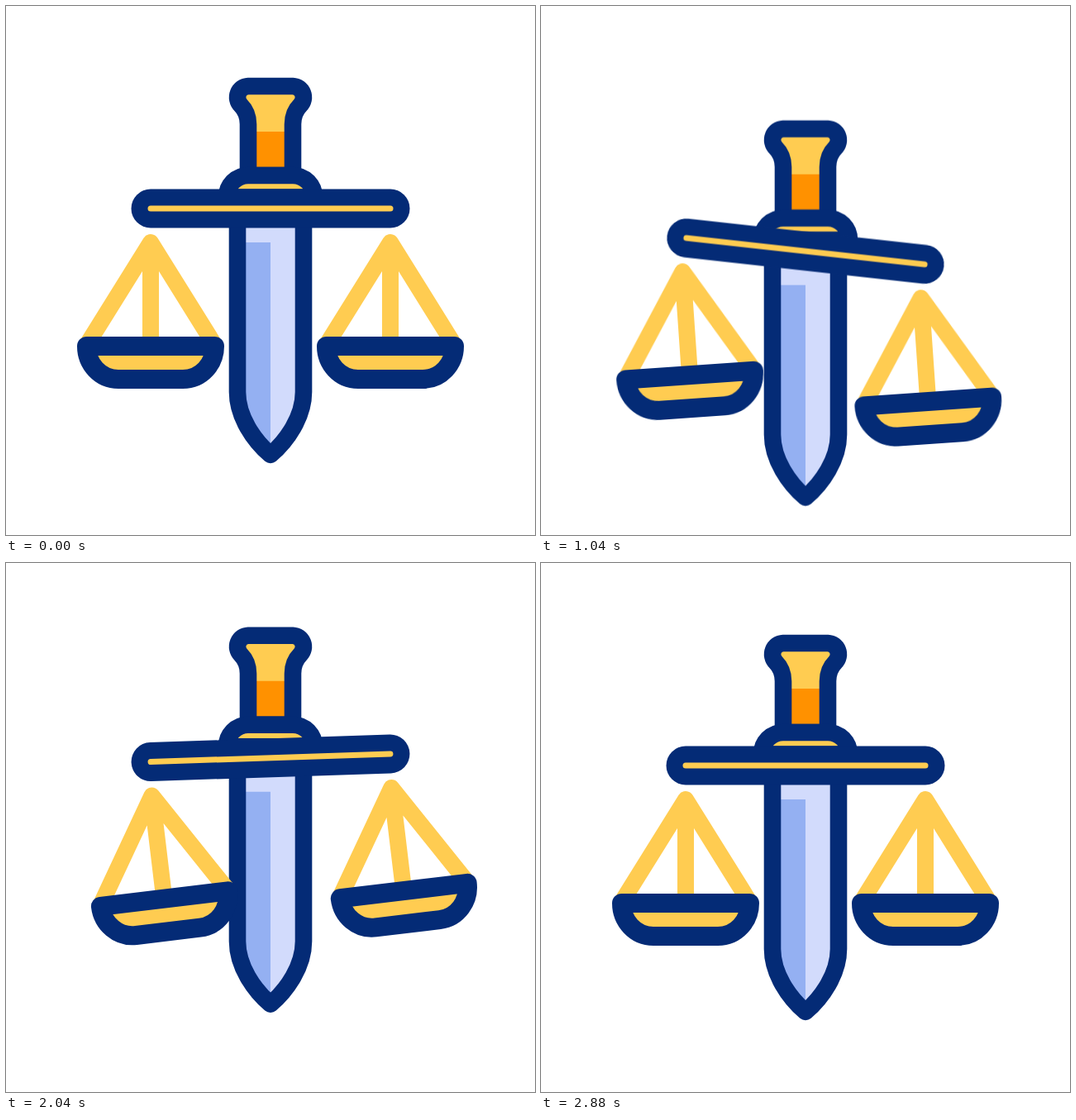
An HTML page that plays this animation: 640x640 px, repeating every 3000 ms.

```html
<!DOCTYPE html>
<html lang="en">
<head>
<meta charset="utf-8">
<title>Sword and scales</title>
<style>
  @property --lift  { syntax: '<length>'; inherits: true; initial-value: 0px; }
  @property --sway  { syntax: '<angle>'; inherits: true; initial-value: 0deg; }
  @property --tilt  { syntax: '<angle>'; inherits: true; initial-value: 0deg; }
  @property --swing { syntax: '<angle>'; inherits: true; initial-value: 0deg; }

  html, body { margin: 0; width: 100%; height: 100%; overflow: hidden; background: #fff; }
  svg { display: block; width: 100vw; height: 100vh; }

  .line { fill: none; stroke: #042b76; stroke-width: 20.6; stroke-linejoin: round; }
  .gold { fill: #ffcc51; }
  .cord { fill: none; stroke: #ffcc51; stroke-width: 20; stroke-linecap: round; stroke-linejoin: round; }
  .bowl { stroke-width: 23; }

  #sword {
    transform: translateY(var(--lift)) rotate(var(--sway));
    transform-origin: 320px 546px;
    animation: 3s ease-in-out infinite;
    animation-name: lift, sway, tilt, swing;
  }
  #beam { transform: rotate(var(--tilt)); transform-origin: 320px 245px; }
  .pan { transform: rotate(calc(var(--swing) - var(--tilt))); transform-origin: 175px 286px; }
  .right { transform-origin: 465px 286px; }
  .spark { animation: spark 3s ease-in-out infinite; }

  /* Rise, drop, stay stuck, spring back up, settle */
  @keyframes lift {
    0%, 7.33% { --lift: 0px; }
    16.67% { --lift: -13px; animation-timing-function: cubic-bezier(.33, 0, .67, 0); }
    37.33% { --lift: 84.5px; }
    47.33% { --lift: 84.5px; animation-timing-function: cubic-bezier(.42, 0, .2, 1); }
    74.67% { --lift: -13px; }
    96%, 100% { --lift: 0px; }
  }
  @keyframes sway {
    0%, 37.33% { --sway: 0deg; }
    40.33% { --sway: -2.8deg; }
    44% { --sway: 2.8deg; }
    48%, 100% { --sway: 0deg; }
  }
  @keyframes tilt {
    0%, 12% { --tilt: 0deg; animation-timing-function: cubic-bezier(.6, 0, .6, 1); }
    48% { --tilt: 10.3deg; animation-timing-function: cubic-bezier(.7, 0, .37, 1); }
    77.33% { --tilt: -4deg; }
    96%, 100% { --tilt: 0deg; }
  }
  @keyframes swing {
    0%, 7.33% { --swing: 0deg; }
    24.67% { --swing: 1deg; }
    44% { --swing: -8.3deg; }
    56% { --swing: 4.1deg; }
    73% { --swing: -9.2deg; animation-timing-function: cubic-bezier(.3, 0, .58, 1); }
    96%, 100% { --swing: 0deg; }
  }
  @keyframes spark {
    0%, 37.3% { stroke-dasharray: 0 3; stroke-dashoffset: 0; opacity: 0; }
    37.34% { stroke-dasharray: 0 3; opacity: 1; }
    43.3%, 44% { stroke-dasharray: 1 3; stroke-dashoffset: 0; }
    49.3% { stroke-dasharray: 0 3; stroke-dashoffset: -1; opacity: 1; }
    49.34%, 100% { stroke-dasharray: 0 3; stroke-dashoffset: -1; opacity: 0; }
  }
</style>
</head>
<body>
<svg viewBox="0 0 640 640">
  <defs>
    <g id="scale">
      <path class="cord" style="stroke-linecap:butt" d="M99 408L175 286L251 408M175 286V410"/>
      <path class="line gold bowl" d="M97.5 411.5H252.5C252.5 433 236 451.5 214 451.5H136C114 451.5 97.5 433 97.5 411.5Z"/>
    </g>
    <path id="edge" d="M280 245V467C280 497 300 526 320 543C340 526 360 497 360 467V245Z"/>
    <path id="grip" d="M293 205V143C293 134 290 126 284 120A13.5 13.5 0 0 1 293 97H347A13.5 13.5 0 0 1 356 120C350 126 347 134 347 143V205Z"/>
  </defs>
  <g class="cord">
    <path class="spark" pathLength="1" d="M268.5 626.5L236 593.5"/>
    <path class="spark" pathLength="1" d="M373 624.5L406.5 590.5"/>
  </g>
  <g id="sword">
    <use href="#edge" fill="#d2dbfc"/>
    <path fill="#94b0f2" d="M280 286H320V543C300 526 280 497 280 467Z"/>
    <use href="#edge" class="line"/>
    <use href="#grip" class="gold"/>
    <path fill="#ff9100" d="M293 152H347V205H293Z"/>
    <use href="#grip" class="line"/>
    <path class="line gold" d="M267 231.5A26 26 0 0 1 293 205H347A26 26 0 0 1 373 231.5Z"/>
    <g id="beam">
      <path class="line" style="stroke-width:47;stroke-linecap:round" d="M175 245H465"/>
      <path class="cord" style="stroke-width:7" d="M175 245H465"/>
      <g class="pan"><use href="#scale"/></g>
      <g class="pan right"><use href="#scale" x="290"/></g>
    </g>
  </g>
</svg>
</body>
</html>
```
